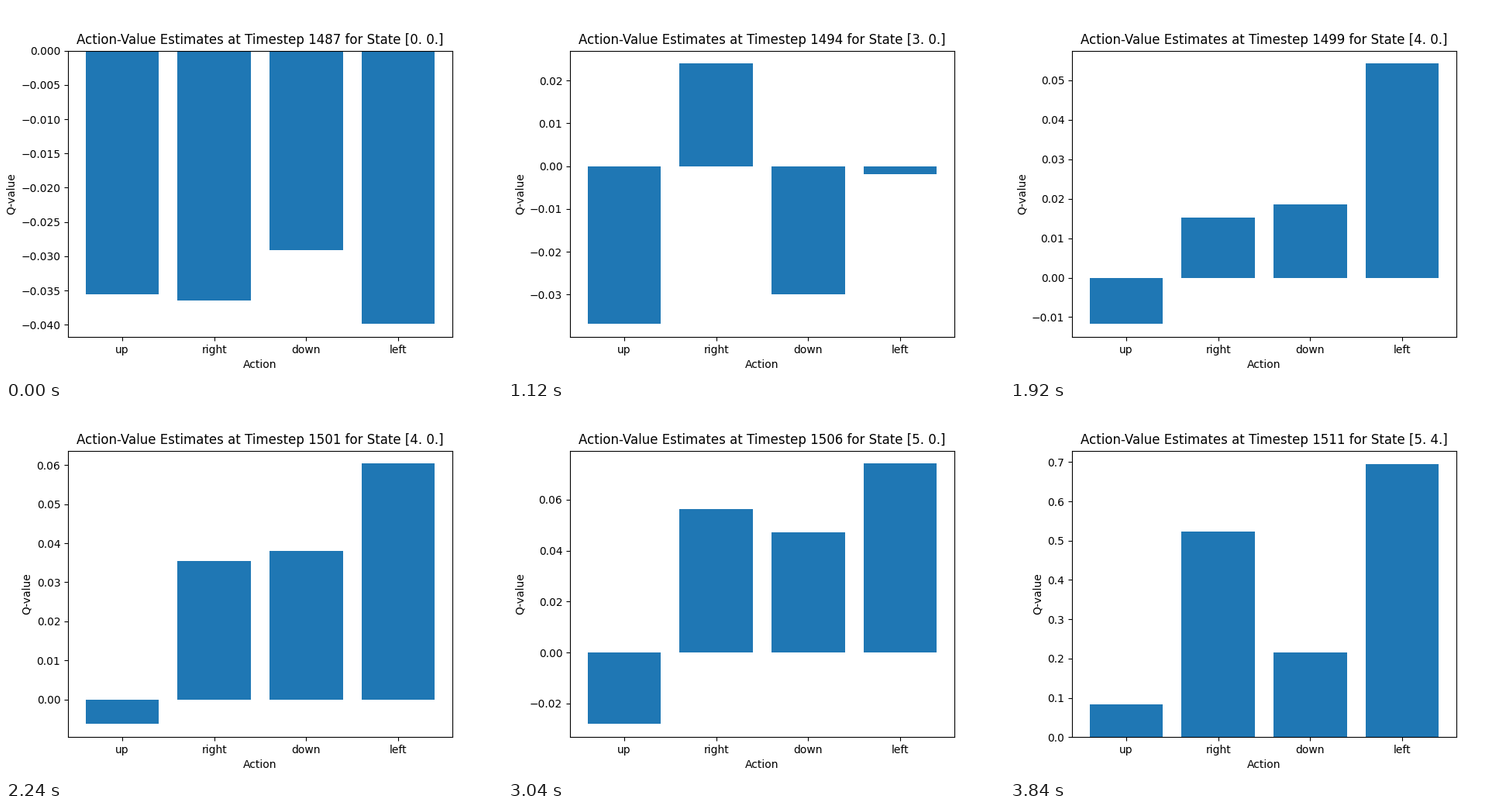
Recreate the animation shown at these times as a matplotlib script. Size 640x480 px, loop 4 s.

```python
import matplotlib.pyplot as plt
import numpy as np
from matplotlib.animation import FuncAnimation

ACTIONS = ["up", "right", "down", "left"]
FIRST_STEP = 1487
FRAMES = 25

# Steps at which each coordinate of the agent grows by one
X_MOVES = [4, 6, 7, 9, 19]
Y_MOVES = [20, 21, 23, 24]

LINEAR, LATE = 1, 4  # easing powers

# Step: easing towards the next key, Q-values in thousandths
KEYS = {
    0: (LINEAR, [-35.55, -36.45, -29.1, -39.81]),
    3: (LINEAR, [-37.31, -23.89, -25.9, -26.54]),
    7: (LINEAR, [-36.913, 23.957, -29.96, -1.9]),
    9: (LINEAR, [-2.2, 20, 12, 45]),
    10: (LATE, [-10.1, 12, 15, 28.5]),
    12: (LINEAR, [-11.758, 15.23, 18.56, 54.228]),
    13: (LINEAR, [8, 34, 36, 62]),
    17: (LATE, [-49.3, 39.4, 44.1, 55.5]),
    20: (LINEAR, [58, 125, 60, 150]),
    21: (LATE, [80.5, 177.6, 78.2, 203.6]),
    24: (LINEAR, [83.2, 523, 215.5, 694.3]),
}
STEPS = list(KEYS)

fig, ax = plt.subplots(figsize=(6.4, 4.8), dpi=100)


def q_values(i):
    """Ease between the two keys around step i."""
    k = min(np.searchsorted(STEPS, i, side="right"), len(STEPS) - 1)
    start, end = STEPS[k - 1], STEPS[k]
    power, a = KEYS[start]
    b = KEYS[end][1]
    t = ((i - start) / (end - start)) ** power
    return (np.array(a) * (1 - t) + np.array(b) * t) / 1000


def state(i):
    """Grid position of the agent at step i."""
    return np.array([np.searchsorted(moves, i, side="right")
                     for moves in (X_MOVES, Y_MOVES)], dtype=float)


def draw(i):
    ax.clear()
    ax.bar(ACTIONS, q_values(i), color="#1f77b4")
    ax.set_title(f"Action-Value Estimates at Timestep {FIRST_STEP + i} "
                 f"for State {state(i)}")
    ax.set_xlabel("Action")
    ax.set_ylabel("Q-value")


anim = FuncAnimation(fig, draw, frames=FRAMES, interval=160,
                     repeat=True, repeat_delay=0)
plt.show()
```
